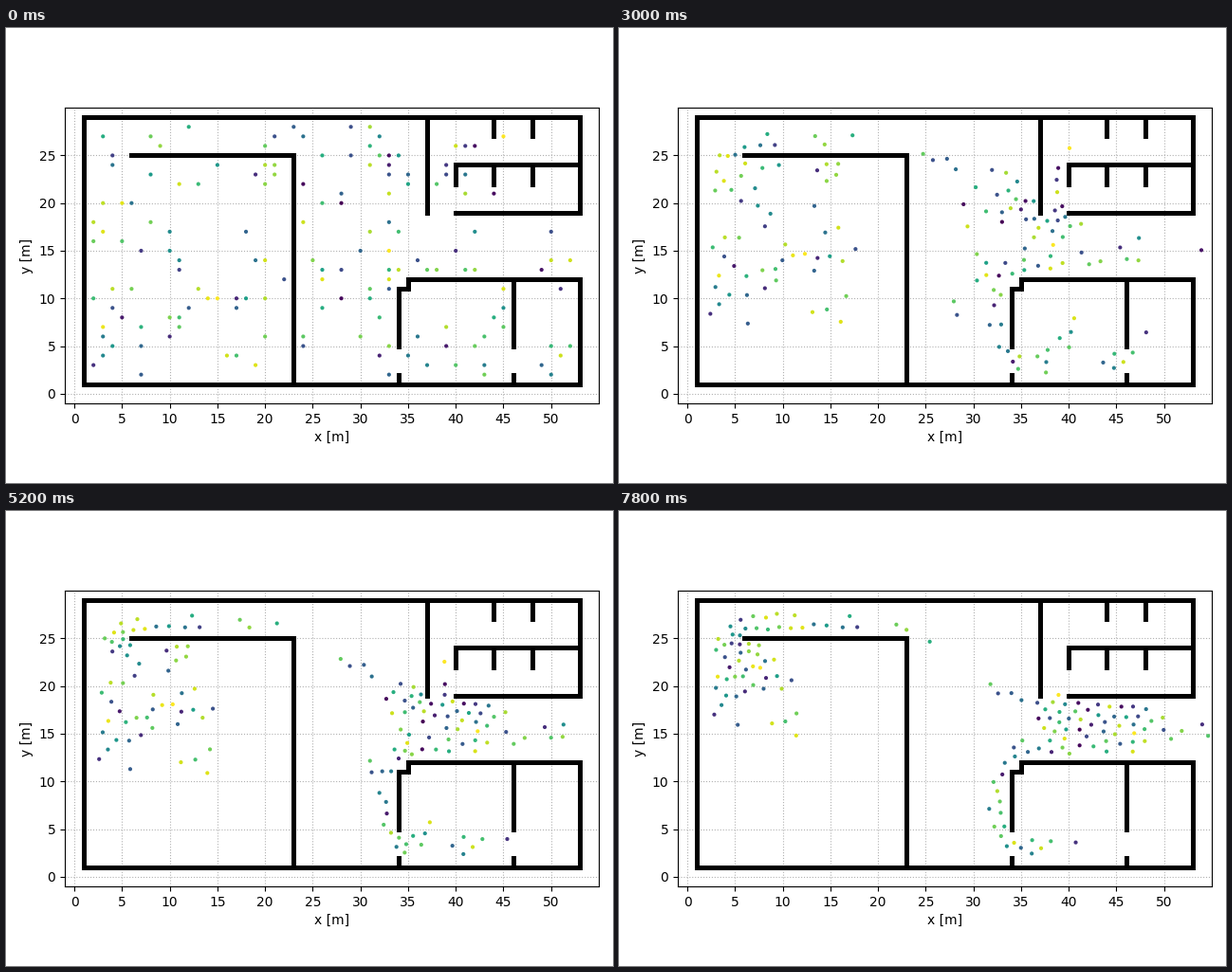
A matplotlib script that plays this animation: 640 by 480 pixels, repeating every 8 s.

```python
import numpy as np
import matplotlib.pyplot as plt
from matplotlib.animation import FuncAnimation

W, H, DPI = 640, 480, 100
FRAMES, INTERVAL = 40, 200
SUBSTEPS = 4
DT = INTERVAL / 1000 / SUBSTEPS
PEOPLE = 150
SPEED, BODY, HEADWAY = 1.8, 0.5, 0.4
CLEARANCE = 0.7

# Floor plan as polylines, in metres
WALLS = [
    [(53, 19), (53, 29), (1, 29), (1, 1), (53, 1), (53, 12), (35, 12),
     (35, 11), (34, 11), (34, 5)],
    [(6, 25), (23, 25), (23, 1)],
    [(37, 29), (37, 19)],
    [(40, 19), (53, 19)],
    [(53, 24), (40, 24), (40, 22)],
    [(46, 12), (46, 5)],
    *([(x, 24), (x, 22)] for x in (44, 48)),
    *([(x, 29), (x, 27)] for x in (44, 48)),
    *([(x, 2), (x, 1)] for x in (34, 46)),
]

# Points people steer by: the exit first, then doors and corners
WAYPOINTS = np.array([
    (54, 15.5), (36.8, 16.5), (38.9, 19), (39, 25.7), (46, 20.4),
    (32, 12), (34, 3.1), (46, 3.1), (24, 26.2), (4, 26.3), (4.3, 24.9),
])

segments = [pair for line in WALLS for pair in zip(line, line[1:])]
seg_a = np.array([a for a, b in segments], float)
seg_d = np.array([b for a, b in segments], float) - seg_a


def unit(v):
    return v / np.maximum(np.linalg.norm(v, axis=-1, keepdims=True), 1e-9)


def cross(u, v):
    return u[..., 0] * v[..., 1] - u[..., 1] * v[..., 0]


def from_walls(pos):
    """Vector from the nearest point of each wall to each person."""
    rel = pos[:, None] - seg_a
    t = (rel * seg_d).sum(-1) / (seg_d ** 2).sum(-1)
    return rel - np.clip(t, 0, 1)[..., None] * seg_d


def walk_cost(pos):
    """Distance from each person to each waypoint, dear where walls block."""
    way = WAYPOINTS - pos[:, None]
    a = seg_a - CLEARANCE * unit(seg_d)
    d = seg_d + 2 * CLEARANCE * unit(seg_d)
    p, w = pos[:, None, None], way[:, :, None]
    det = cross(w, d)
    det = np.where(np.abs(det) < 1e-9, 1e-9, det)
    along_way = cross(a - p, d) / det
    along_wall = cross(a - p, w) / det
    hit = ((along_way > 0) & (along_way < 1)
           & (along_wall > 0) & (along_wall < 1))
    return np.linalg.norm(way, axis=-1) + 100 * hit.sum(-1)


def route_lengths():
    links = walk_cost(WAYPOINTS)
    rest = np.full(len(WAYPOINTS), 1e4)
    rest[0] = 0
    for _ in WAYPOINTS:
        rest = np.minimum(rest, (links + rest).min(axis=1))
    return rest


rest = route_lengths()


def goals(pos):
    goal = WAYPOINTS[np.argmin(walk_cost(pos) + rest, axis=1)]
    outside = pos[:, :1] > 53
    return np.where(outside, WAYPOINTS[0] + (40, 0), goal)


def repel(diff, strength, size, reach):
    """Sum of pushes along diff that fade with distance."""
    dist = np.linalg.norm(diff, axis=-1, keepdims=True)
    return (unit(diff) * strength * np.exp((size - dist) / reach)).sum(axis=1)


def step(pos):
    between = pos[:, None] - pos[None]
    heading = unit(unit(goals(pos) - pos)
                   + repel(between, 3, BODY, 0.25)
                   + repel(from_walls(pos), 5, 0.3, 0.2))

    # Slow down behind the nearest person ahead
    ahead = -(between * heading[:, None]).sum(-1)
    aside = np.abs(cross(between, heading[:, None]))
    blocked = (ahead > 1e-6) & (aside < BODY)
    gap = np.where(blocked, np.linalg.norm(between, axis=-1), 99).min(axis=1)
    speed = np.clip((gap - BODY) / HEADWAY, 0.05, SPEED)
    return pos + heading * speed[:, None] * DT


def start(rng):
    """Random free grid cells; the rooms at the far top right stay empty."""
    x, y = np.meshgrid(np.arange(2, 53), np.arange(2, 29))
    cells = np.column_stack([x.ravel(), y.ravel()]).astype(float)
    room = np.linalg.norm(from_walls(cells), axis=-1).min(axis=1)
    closed = (cells[:, 0] > 45) & (cells[:, 1] > 18)
    free = cells[(room > 0.9) & ~closed]
    return free[rng.choice(len(free), PEOPLE, replace=False)]


def walk(pos):
    path = [pos]
    for _ in range(FRAMES - 1):
        for _ in range(SUBSTEPS):
            pos = step(pos)
        path.append(pos)
    return path


rng = np.random.default_rng(4)
path = walk(start(rng))
shades = rng.random(PEOPLE)

fig = plt.figure(figsize=(W / DPI, H / DPI), dpi=DPI)
scale = 10.053
width, height = 56 * scale, 31 * scale
ax = fig.add_axes([(625 - width) / W, (H - height) / 2 / H,
                   width / W, height / H])
ax.set(xlim=(-1, 55), ylim=(-1, 30), xlabel="x [m]", ylabel="y [m]",
       xticks=range(0, 51, 5), yticks=range(0, 26, 5))
ax.set_axisbelow(True)
ax.grid(linestyle=":")

for line in WALLS:
    ax.plot(*zip(*line), color="k", lw=3.6,
            solid_capstyle="projecting", solid_joinstyle="miter")
dots = ax.scatter(*path[0].T, c=shades, cmap="viridis", vmin=0, vmax=1,
                  s=9, linewidths=0, zorder=3)


def update(i):
    dots.set_offsets(path[i])
    return [dots]


anim = FuncAnimation(fig, update, frames=FRAMES, interval=INTERVAL, repeat=True)
plt.show()
```
